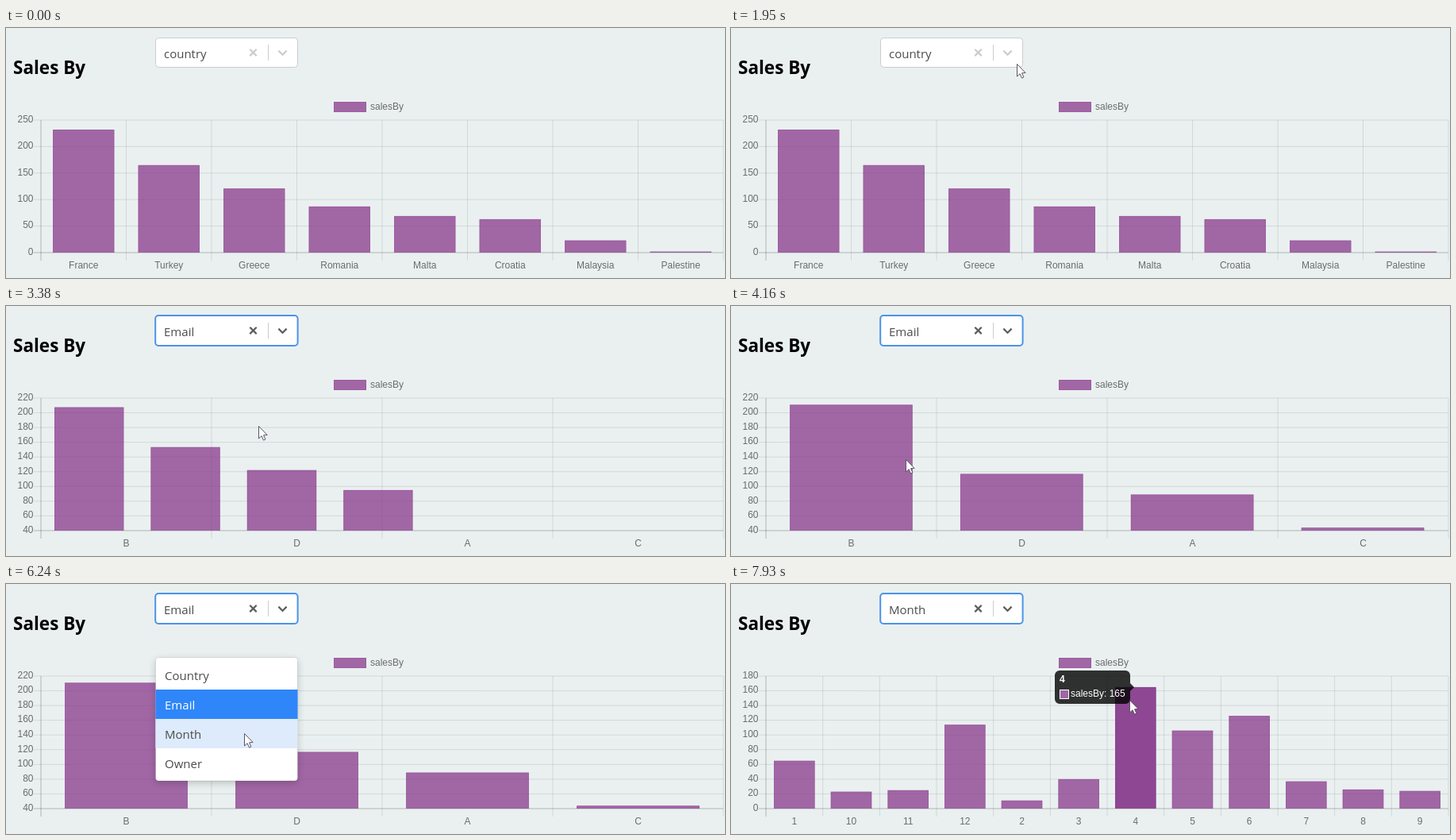
An HTML page with a canvas that plays this animation: 906x315 px, repeating every 8000 ms.

```html
<!DOCTYPE html>
<html lang="en">
<head>
<meta charset="utf-8">
<title>Sales By</title>
<style>
  html, body { margin: 0; width: 100%; height: 100%; overflow: hidden; background: #eaf0f0; }
  canvas { display: block; }
</style>
</head>
<body>
<canvas id="stage" width="906" height="315"></canvas>
<script>
const ctx = document.getElementById('stage').getContext('2d');
const LOOP = 8000, STEP = 130;
const UI = '"Open Sans", "Noto Sans", sans-serif';
const CHART = '"Liberation Sans", Arial, sans-serif';
const AREA = { left: 44, right: 904, top: 116, bottom: 283 };
const BAR = 'rgba(136,58,140,.75)', BAR_HOVER = '#8e4792', BAR_EDGE = 'rgba(136,52,140,.22)';
const OPTIONS = ['Country', 'Email', 'Month', 'Owner'];
const MENUS = [[2600, 3346], [4940, 6374]];
const FOCUS_AT = 2600, HOVER_AT = 7520;

const charts = [
  { start: -2000, value: 'country', min: 0, max: 250, step: 50,
    labels: ['France', 'Turkey', 'Greece', 'Romania', 'Malta', 'Croatia', 'Malaysia', 'Palestine'],
    data: [232, 165, 121, 87, 69, 63, 23, 2] },
  { start: 3346, value: 'Email', min: 40, max: 220, step: 20,
    labels: ['B', 'D', 'A', 'C'],
    data: [211, 117, 89, 44] },
  { start: 6374, value: 'Month', min: 0, max: 180, step: 20,
    labels: ['1', '10', '11', '12', '2', '3', '4', '5', '6', '7', '8', '9'],
    data: [65, 23, 25, 114, 11, 40, 165, 106, 126, 37, 26, 24] }
];

// Pointer path: time, x, y
const pointerPath = [
  [1950, 360, 45], [2340, 360, 45], [2600, 349, 36], [2860, 349, 36],
  [3250, 318, 151], [3380, 318, 151], [4160, 220, 193], [4810, 350, 36],
  [5400, 350, 36], [5460, 356, 75], [6240, 300, 188], [6370, 300, 188],
  [6760, 366, 95], [7540, 495, 146], [7800, 502, 146], [LOOP, 502, 146]
];

const clamp = v => Math.min(1, Math.max(0, v));
const lerp = (a, b, p) => a + (b - a) * p;
const easeOutQuart = p => 1 - (1 - clamp(p)) ** 4;
const smooth = p => p * p * (3 - 2 * p);

function text(str, x, y, font, color, align = 'left', baseline = 'alphabetic') {
  Object.assign(ctx, { font, fillStyle: color, textAlign: align, textBaseline: baseline });
  ctx.fillText(str, x, y);
}

function rect(x, y, w, h, color) {
  ctx.fillStyle = color;
  ctx.fillRect(x, y, w, h);
}

function polyline(points, color, width = 1) {
  ctx.beginPath();
  points.forEach(([x, y]) => ctx.lineTo(x, y));
  ctx.strokeStyle = color;
  ctx.lineWidth = width;
  ctx.stroke();
}

function roundRect(x, y, w, h, r) {
  ctx.beginPath();
  ctx.roundRect(x, y, w, h, r);
}

function restingBars({ data, min, max }) {
  const slot = (AREA.right - AREA.left) / data.length;
  return data.map((v, i) => ({
    x: AREA.left + slot * (i + .5),
    w: slot * .72,
    h: (v - min) / (max - min) * (AREA.bottom - AREA.top)
  }));
}

function barsAt(index, t) {
  const target = restingBars(charts[index]);
  const old = index ? restingBars(charts[index - 1]) : target;
  const p = easeOutQuart((t - charts[index].start) / 1000);
  return target.map((bar, i) => {
    const from = old[i] || { x: bar.x, w: old[0].w, h: 0 };
    return { x: lerp(from.x, bar.x, p), w: lerp(from.w, bar.w, p), h: lerp(from.h, bar.h, p) };
  });
}

function drawAxes({ labels, min, max, step }) {
  const { left, right, top, bottom } = AREA;
  const color = first => first ? 'rgba(0,0,0,.25)' : 'rgba(0,0,0,.1)';
  for (let v = min; v <= max; v += step) {
    const y = lerp(bottom, top, (v - min) / (max - min));
    polyline([[left - 9, y], [right, y]], color(v === min));
    text(v, left - 9.5, y - .5, '12px ' + CHART, '#6c6c6c', 'right', 'middle');
  }
  const slot = (right - left) / labels.length;
  for (let i = 0; i <= labels.length; i++) {
    const x = left + slot * i;
    polyline([[x, top], [x, bottom + 10]], color(i === 0));
  }
  labels.forEach((label, i) =>
    text(label, left + slot * (i + .5), 303, '12px ' + CHART, '#6c6c6c', 'center'));
}

function drawBar({ x, w, h }, hovered) {
  const l = x - w / 2, r = x + w / 2, top = AREA.bottom - h;
  rect(l, top, w, h, hovered ? BAR_HOVER : BAR);
  polyline([[l + .5, AREA.bottom], [l + .5, top + .5], [r - .5, top + .5], [r - .5, AREA.bottom]], BAR_EDGE);
}

function drawChart(index, t) {
  drawAxes(charts[index]);
  rect(413, 93, 41, 13, BAR);
  ctx.strokeStyle = BAR_EDGE;
  ctx.strokeRect(413.5, 93.5, 40, 12);
  text('salesBy', 459, 103, '12px ' + CHART, '#6c6c6c');
  barsAt(index, t).forEach((bar, i) => drawBar(bar, t >= HOVER_AT && i === 6));
}

function drawTooltip(t) {
  ctx.globalAlpha = easeOutQuart((t - HOVER_AT) / 400);
  ctx.fillStyle = 'rgba(0,0,0,.8)';
  roundRect(408, 109, 95, 42, 6);
  ctx.moveTo(503, 125);
  ctx.lineTo(508, 130);
  ctx.lineTo(503, 135);
  ctx.fill();
  text('4', 414, 124, 'bold 12px ' + CHART, '#fff');
  rect(414, 133, 12, 12, '#fff');
  rect(415, 134, 10, 10, '#a067a4');
  text('salesBy: 165', 428, 142, '12px ' + CHART, '#fff');
  ctx.globalAlpha = 1;
}

function drawSelect(value, focused, open, t) {
  ctx.fillStyle = '#fff';
  ctx.strokeStyle = focused ? '#4a93ea' : '#ccc';
  ctx.lineWidth = focused ? 2 : 1;
  if (focused) roundRect(188.2, 12, 179.4, 38, 4);
  else roundRect(188.5, 12.5, 179, 37, 4);
  ctx.fill();
  ctx.stroke();
  text(value, 199, 38, '15px ' + UI, '#4c4c4c');

  const icon = focused ? '#5c5c5c' : '#ccc';
  polyline([[307.3, 26.7], [315.7, 35.1]], icon, 2.2);
  polyline([[315.7, 26.7], [307.3, 35.1]], icon, 2.2);
  polyline([[330.5, 21], [330.5, 41]], '#ccc');
  polyline([[343.4, 28.6], [348.5, 33.7], [353.6, 28.6]], icon, 2.2);
  if (open && (t - 5460) % 1060 < 530) polyline([[199.5, 24], [199.5, 41]], '#555');
}

function drawMenu(selected, pointer) {
  ctx.save();
  ctx.shadowColor = 'rgba(0,0,0,.2)';
  ctx.shadowBlur = 10;
  ctx.shadowOffsetY = 3;
  ctx.fillStyle = '#fff';
  roundRect(188.5, 92.5, 179, 155.5, 4);
  ctx.fill();
  ctx.restore();
  ctx.strokeStyle = 'rgba(0,0,0,.1)';
  ctx.lineWidth = 1;
  ctx.stroke();

  const rowTop = 96, rowHeight = 37;
  const focusedRow = Math.max(0, Math.floor((pointer.y - rowTop) / rowHeight));
  OPTIONS.forEach((option, i) => {
    const y = rowTop + i * rowHeight, chosen = option === selected;
    if (chosen || i === focusedRow) rect(188.5, y, 179, rowHeight, chosen ? '#2f86f8' : '#deebfc');
    text(option, 200, y + 25, '15px ' + UI, chosen ? '#fff' : '#4c4c4c');
  });
}

function pointerAt(t) {
  const next = pointerPath.findIndex(key => key[0] > t);
  if (next < 1) return null;
  const [t0, x0, y0] = pointerPath[next - 1], [t1, x1, y1] = pointerPath[next];
  const p = smooth((t - t0) / (t1 - t0));
  return { x: lerp(x0, x1, p), y: lerp(y0, y1, p) };
}

function drawPointer({ x, y }) {
  const shape = [[0, 0], [0, 15.5], [3.6, 12.2], [6, 17.6], [8.4, 16.5], [6, 11.3], [10.6, 11]];
  ctx.beginPath();
  shape.forEach(([dx, dy]) => ctx.lineTo(x + .5 + dx, y + .5 + dy));
  ctx.closePath();
  ctx.fillStyle = '#fff';
  ctx.strokeStyle = '#5a5560';
  ctx.lineWidth = 1;
  ctx.fill();
  ctx.stroke();
}

function draw(t) {
  const index = charts.findLastIndex(chart => t >= chart.start);
  const { value } = charts[index];
  const pointer = pointerAt(t);
  const open = MENUS.some(([from, to]) => t >= from && t < to);

  rect(0, 0, 906, 315, '#eaf0f0');
  text('Sales By', 9, 58, 'bold 22.5px ' + UI, '#000');
  drawChart(index, t);
  drawSelect(value, t >= FOCUS_AT, open, t);
  if (open) drawMenu(value, pointer);
  if (t >= HOVER_AT) drawTooltip(t);
  if (pointer) drawPointer(pointer);
}

function tick() {
  const t = performance.now() % LOOP;
  draw(Math.floor(t / STEP) * STEP);
  requestAnimationFrame(tick);
}
tick();
</script>
</body>
</html>
```
